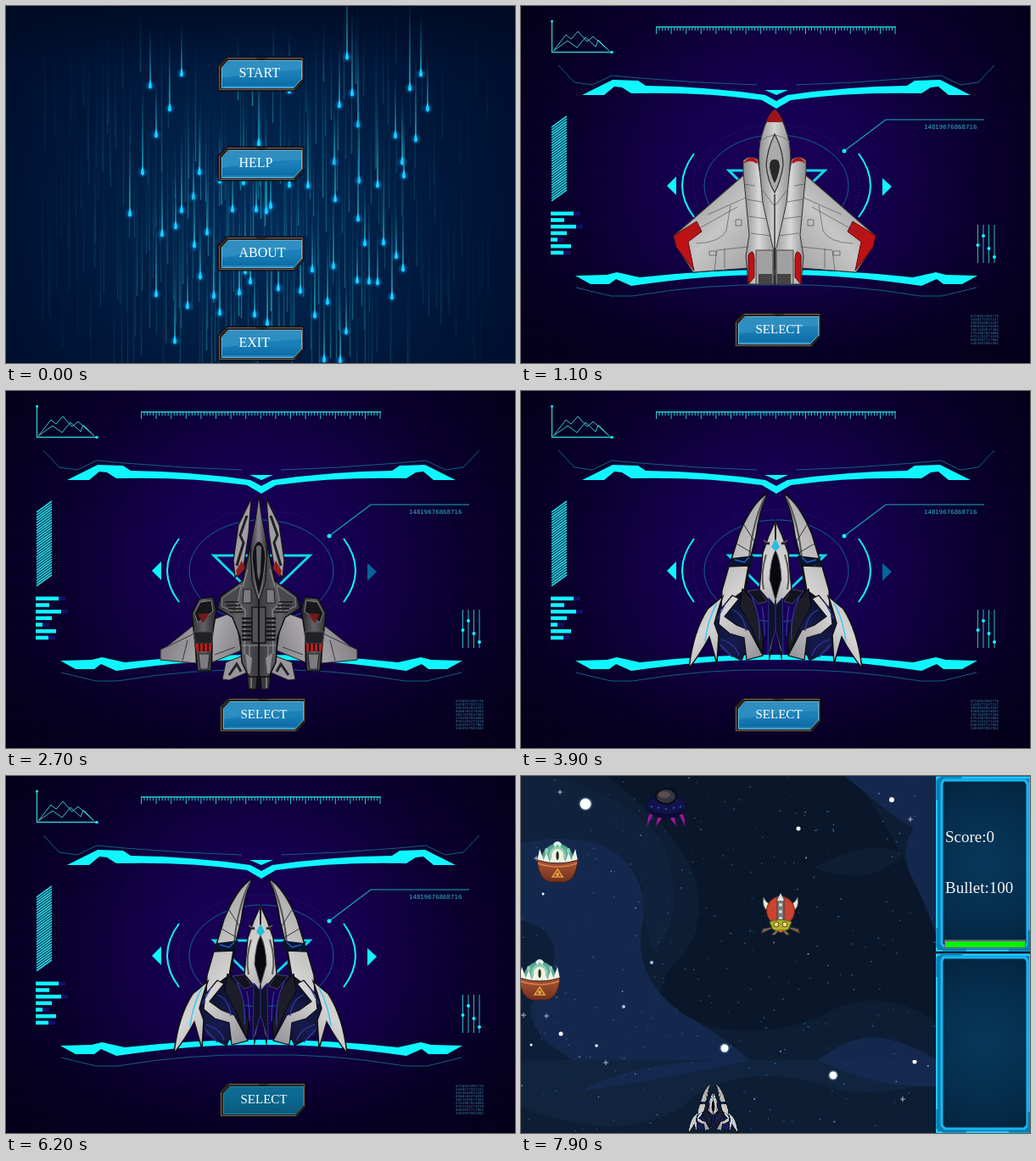
An HTML page with a canvas for the animation above (8 s loop, 600 px wide and 421 px high).

```html
<!DOCTYPE html>
<html lang="en">
<head>
<meta charset="utf-8">
<title>Space shooter</title>
<style>
html, body { margin: 0; width: 100%; height: 100%; overflow: hidden; background: #000; }
canvas { display: block; width: 600px; height: 421px; }
</style>
</head>
<body>
<canvas id="stage" width="600" height="421"></canvas>
<script>
const W = 600, H = 421, LOOP = 8000;
const SERIF = '"Liberation Serif", serif', SANS = '"DejaVu Sans", sans-serif';
const CYAN = '#0ff6ff', TEAL = '#18a9b8';
let g;

function seeded(seed) {
  return () => {
    seed = (seed + 0x6D2B79F5) | 0;
    let t = Math.imul(seed ^ (seed >>> 15), 1 | seed);
    t = (t + Math.imul(t ^ (t >>> 7), 61 | t)) ^ t;
    return ((t ^ (t >>> 14)) >>> 0) / 4294967296;
  };
}

function shape(d, fill, stroke, width = 1) {
  const p = new Path2D(d);
  if (fill) { g.fillStyle = fill; g.fill(p); }
  if (stroke) { g.strokeStyle = stroke; g.lineWidth = width; g.stroke(p); }
}

function oval(x, y, rx, ry, fill, stroke, width = 1) {
  g.beginPath();
  g.ellipse(x, y, rx, ry, 0, 0, 7);
  if (fill) { g.fillStyle = fill; g.fill(); }
  if (stroke) { g.strokeStyle = stroke; g.lineWidth = width; g.stroke(); }
}

function rect(x, y, w, h, fill) { g.fillStyle = fill; g.fillRect(x, y, w, h); }

function text(s, x, y, font, fill) {
  g.font = font;
  g.fillStyle = fill;
  g.fillText(s, x, y);
}

function ramp(x0, y0, x1, y1, ...colors) {
  const r = g.createLinearGradient(x0, y0, x1, y1);
  colors.forEach((c, i) => r.addColorStop(i / (colors.length - 1), c));
  return r;
}

function glow(x, y, radius, ...colors) {
  const r = g.createRadialGradient(x, y, 0, x, y, radius);
  colors.forEach((c, i) => r.addColorStop(i / (colors.length - 1), c));
  return r;
}

// Draws a half and its reflection about the vertical line at x.
function mirrored(x, half) {
  half();
  g.save();
  g.translate(2 * x, 0);
  g.scale(-1, 1);
  half();
  g.restore();
}

function placed(x, y, draw) {
  g.save();
  g.translate(x, y);
  draw();
  g.restore();
}

function layer(w, h, draw) {
  const c = document.createElement('canvas');
  c.width = w;
  c.height = h;
  g = c.getContext('2d');
  draw();
  return c;
}

function button(x, y, label, size, pressed) {
  placed(x, y, () => {
    shape('M10 0H101V28L91 40H0V10Z', '#2b2524', '#0b0b12');
    shape('M11 1.500H99.500V27M1.500 11V38.500H90', null, '#6b5a55');
    shape('M12 4.500H98.500V26L89 36.500H4.500V13Z',
      pressed ? ramp(0, 4, 0, 37, '#0f6d96', '#0b668c', '#0a5879') : ramp(0, 4, 0, 37, '#2380b6', '#1a80b8', '#0a67a2'),
      pressed ? '#1787a8' : '#5cb9dd');
    if (!pressed) {
      shape('M13 5.500H98V15Q55 17 5 25V14Z', 'rgba(110,195,230,.2)');
      shape('M6 35H89', null, '#38a8da');
    }
    shape('M45 1H58M48 3H55', null, '#111');
    text(label, 24.500, 24, size + 'px ' + SERIF, '#fff');
  });
}

// ---- Menu ----
const DROPS = [170,94, 207,80, 193,121, 177,152, 161,196, 146,245, 184,269, 200,260, 207,241, 221,225,
  228,196, 237,267, 222,282, 267,240, 252,206, 280,208, 295,240, 312,236, 307,242, 334,100,
  334,211, 356,212, 387,184, 393,117, 402,60, 408,103, 415,140, 416,206, 388,228, 415,251,
  438,211, 459,153, 467,184, 469,200, 476,97, 489,80, 497,121, 483,157, 445,279, 423,280,
  460,295, 468,310, 428,325, 438,326, 455,343, 386,307, 414,324, 379,349, 361,311, 364,365,
  401,384, 347,336, 321,333, 282,313, 275,338, 293,364, 308,374, 288,325, 245,342, 252,362,
  229,319, 214,354, 177,340, 199,395, 375,417, 394,418, 298,162];

function streak(x, top, bottom, color, width) {
  rect(x - width / 2, top, width, bottom - top, ramp(0, top, 0, bottom, 'rgba(10,90,130,0)', color));
}

const menuLayer = layer(W, H, () => {
  const rnd = seeded(11);
  rect(0, 0, W, H, glow(300, 250, 360, '#022a56', '#012148', '#001638', '#000e2c'));
  rect(0, 0, W, 70, ramp(0, 0, 0, 70, 'rgba(0,10,32,.7)', 'rgba(0,10,32,0)'));
  for (let i = 0; i < 260; i++) {
    const x = 42 + Math.round((i * 7.7) % 530);
    const strength = Math.max(.12, 1 - Math.abs(x - 305) / 265);
    const top = rnd() * 330 - 10;
    streak(x + .5, top, top + 70 + rnd() * 130, `rgba(30,150,170,${(.45 + rnd() * .5) * strength})`, 1.4);
  }
  for (let i = 0; i < DROPS.length; i += 2) {
    const x = DROPS[i], y = DROPS[i + 1];
    streak(x, y - 60 - rnd() * 60, y, '#1fa3c0', 1.8);
    oval(x, y, 6, 8, glow(x, y, 7, 'rgba(0,160,255,.65)', 'rgba(0,130,230,0)'));
    shape(`M${x} ${y - 7}Q${x + 4} ${y + 3} ${x} ${y + 3.500}Q${x - 4} ${y + 3} ${x} ${y - 7}`, '#1bd0fb');
  }
});

function menu(t) {
  g.drawImage(menuLayer, 0, 0);
  ['START', 'HELP', 'ABOUT', 'EXIT'].forEach((label, i) =>
    button(250, 60 + i * 106, label, 16, i === 0 && t > 700));
}

// ---- Hangar ----
const hangarLayer = layer(W, H, () => {
  rect(0, 0, W, H, glow(300, 205, 350, '#1b025c', '#15004e', '#0a002e', '#04001a'));
  rect(0, 300, W, 121, ramp(0, 300, 0, H, 'rgba(4,0,26,0)', 'rgba(4,0,26,.65)'));
  for (let i = 8; i < W; i += 27) {
    rect(i, 0, 1, H, 'rgba(70,40,150,.05)');
    rect(0, i, W, 1, 'rgba(70,40,150,.05)');
  }
  // Chart and ruler
  shape('M36.500 18V54.500H107', null, '#35c6d0', 1.3);
  oval(36.500, 18, 1.500, 1.500, CYAN);
  oval(107, 54.500, 2, 1.500, CYAN);
  shape('M38 53L53 34L59 39L67 30L78 42L85 36L104 53M38 53L55 41L66 49L76 37L88 48L91 40L104 53', null, '#3ac9d2');
  rect(159, 24, 283, 1.5, '#25c6d0');
  for (let i = 0; i <= 80; i++) rect(159 + i * 3.52, 24, 1, i % 5 ? 5 : 9, '#25c6d0');
  // Frame
  mirrored(301, () => {
    shape('M44 70L63 90L84 93L107 82L140 85Q210 91 278 93', null, '#155f7e');
    shape('M72 105L108 87L138 88L147 94Q220 95 288 105L301 112V121L284 111Q215 101 130 103L119 96L110 95L98 105Z', CYAN);
    shape('M64 318L101 317L113 314L140 320Q220 311 301 311V317Q225 316 130 330L112 322L104 328H82Z', CYAN);
    shape('M65 332L106 342H131Q220 327 301 329', null, '#155f7e');
    shape('M204 174Q176 212 204 249', null, CYAN, 2);
  });
  shape('M287 99H315L301 105Z', CYAN);
  // Target rings
  g.setLineDash([1, 3]);
  oval(301, 212, 98, 72, null, '#1c3a86');
  g.setLineDash([]);
  oval(301, 212, 85, 60, null, '#11628f');
  shape('M245 194H358L301 249Z', null, '#12d9e8', 3);
  // Side gauges
  for (let y = 143; y < 231; y += 3.1) shape(`M36 ${y}L54 ${y - 13}`, null, '#22d5de', 1.7);
  [27, 16, 30, 19, 8, 24, 15].forEach((w, i) => {
    const y = 242.500 + i * 7.7;
    rect(35, y, i % 2 ? w : w + 8, 4.500, '#140f68');
    rect(35, y, w, 4.500, CYAN);
  });
  [282, 271, 286, 296].forEach((y, i) => {
    const x = 538.500 + i * 6.5;
    rect(x - .5, 258, 1, 45, '#2cb8c8');
    oval(x, y, 2, 2, CYAN);
  });
  shape('M381 171L430 134H546', null, TEAL, 1.2);
  oval(381, 171, 2.5, 2.5, CYAN);
  text('14819676868716', 475, 145, '7px ' + SANS, '#25b5c4');
  const rnd = seeded(5);
  for (let i = 0; i < 9; i++) {
    let digits = '';
    while (digits.length < 13) digits += Math.floor(rnd() * 10);
    text(digits, 530, 367 + i * 4.05, '4px ' + SANS, '#397f9c');
  }
  shape('M172 212L183 201V223Z', CYAN);
});

function heavyFighter() {
  const steel = ramp(180, 200, 299, 310, '#858585', '#c6c6c6', '#999');
  const red = ramp(0, 120, 0, 330, '#a41518', '#c61015');
  mirrored(299, () => {
    shape('M264 198L180 271L183 283L203 314L268 309L276 220Z', steel, '#333', 1.2);
    shape('M180 271L207 254L213 266L197 278L204 312L183 284Z', red, '#5d0b0d');
    shape('M262 196V182Q270 175 279 181L287 230L298 270V328H268L265 295L269 270Z', ramp(262, 0, 299, 0, '#8c8c8c', '#d8d8d8', '#999'), '#333');
    shape('M262 186Q270 173 279 183L278 186Q270 180 262 186Z', red);
    shape('M268 294Q274 284 275 298V320L268 328Z', red, '#511');
    shape('M277 288H297V328H277Z', '#a1a1a1', '#444');
    rect(280, 316, 16, 12, '#444');
    shape('M263 210L276 212M266 228L284 231M268 248L289 251M271 268L295 271M220 246L265 226M207 280Q235 279 242 265L247 235M228 312L231 288L268 284M196 270L255 237M240 309V286',
      null, 'rgba(60,60,60,.55)');
    shape('M253 252h7v7h-7ZM222 289h8v5h-8Z', null, 'rgba(60,60,60,.6)');
  });
  mirrored(299, () => {
    shape('M299 122Q290 130 284 152Q279 168 281 190L285 232L297 285H299Z', ramp(280, 0, 299, 0, '#8e8e8e', '#d2d2d2'));
    shape('M299 122Q290 130 284 152Q279 168 281 190L285 232L297 285', null, '#333');
    shape('M299 122Q293 126 289 137H299Z', '#9b1717');
    shape('M281 160Q290 153 299 152M283 215L298 235', null, '#777');
  });
  shape('M299 151Q309 170 309 188Q306 207 299 220Q291 207 289 188Q290 170 299 151Z', '#aaa', '#333', 1.3);
  shape('M299 181Q305 180 305 190Q303 202 299 209Q295 202 293 190Q293 180 299 181Z', '#28282b');
  shape('M299 222V328', null, '#333', 1.5);
}

function darkRaider() {
  const steel = ramp(182, 270, 298, 320, '#77757a', '#a9a7ab', '#6d6b70');
  const dark = ramp(248, 0, 298, 0, '#2d2d30', '#626266', '#3a3a3e');
  mirrored(298, () => {
    shape('M224 274L190 301L182 305V317L224 321Z', steel, '#222');
    shape('M243 270L270 260L277 306L243 320Z', steel, '#222');
    shape('M189 302L222 286M208 318L214 294M246 311L270 302', null, '#39393d');
    // Prong
    shape('M289 127L274 158L268 200L270 220L280 207L286 168Z', '#a09da2', '#18181a', 1.3);
    shape('M284 147L276 170L280 179L272 206', null, '#202024', 3);
    shape('M271 212L278 200L282 209L273 219Z', '#8f1d20');
    // Tail
    shape('M277 313L259 320L255 340L263 341L286 331Z', '#99969b', '#1b1b1d');
    shape('M263 335L272 322L277 331', null, '#242428', 3);
    shape('M283 325L286 352H295L297 325Z', '#38383c', '#0e0e10', 1.3);
    shape('M289 328V350', null, '#74747a', 2);
    // Engine pod
    shape('M228 245L244 243L248 258L243 290L242 330H226L222 290L219 262Z', ramp(219, 0, 247, 0, '#303034', '#626267', '#28282c'), '#0d0d0f', 1.4);
    shape('M229 249L242 247L244 260L226 273L222 262Z', '#17171a', '#818086');
    shape('M226 263L240 262L232 274Z', '#701a1e');
    shape('M221 284H244L243 298H223Z', '#202125', '#4d4d52');
    shape('M223 298H242V307H224Z', '#b51d20');
    shape('M228 298v9m5-9v9m5-9v9', null, '#2a1010', 2);
    shape('M227 310H240L238 328H229Z', '#7d7b80', '#222');
    // Hull
    shape('M298 166L289 178L283 205L279 224L253 242L249 256L267 267L276 290L278 320L286 337H298Z', dark, '#0c0c0e', 1.4);
    shape('M277 229L255 244L254 254L271 261Z', '#49494d', '#88868c');
    shape('M280 234H289V250H279Z', '#7c7a80', '#1a1a1d');
    shape('M285 210L279 231M270 249L282 258L281 310M278 300H298M287 300V333', null, '#98969c');
    for (let y = 267; y < 295; y += 5) rect(278, y, 12, 2.5, '#17171a');
    for (let y = 248; y < 263; y += 4) rect(258 + (y - 248) / 2, y, 16, 1.5, '#161618');
    shape('M282 309L290 315L288 333H285Z', '#8c8a90');
  });
  shape('M298 124L302 152L308 182L306 224L298 248L290 224L288 182L294 152Z', ramp(288, 0, 308, 0, '#303034', '#85838a', '#2a2a2e'), '#0d0d0f');
  shape('M298 177Q306 180 306 198Q304 222 298 243Q292 222 290 198Q290 180 298 177Z', '#121216', '#727178');
  shape('M295 184Q298 180 301 184L300 214L298 224L296 214Z', '#69676e');
  shape('M290 255H306V297H290Z', '#505055', '#19191c', 1.5);
  shape('M298 255V350', null, '#111114', 2);
}

function bladeShip() {
  const bone = ramp(198, 200, 300, 300, '#a9a8a8', '#d6d4d3', '#929196');
  const navy = ramp(235, 240, 300, 320, '#080d25', '#171b4d', '#0a0b1d');
  mirrored(300, () => {
    shape('M290 121Q272 132 257 169L247 202L270 199L277 171Q280 145 290 121Z', bone, '#101014', 1.6);
    shape('M287 126Q273 155 269 197', null, '#535358', 2);
    shape('M263 158L275 177M254 180L271 190', null, '#333');
    shape('M249 197L274 194L272 207L244 205Z', '#09142c');
    shape('M252 199L263 202L269 196', null, '#2261d4', 1.3);
    shape('M245 207L269 205L266 238L278 260L286 306L267 301L260 318L236 306L226 282L236 244Z', navy, '#101014');
    shape('M245 207L268 206L263 235L248 246L236 256L237 235Z', bone, '#101014', 1.4);
    shape('M261 233L275 249L286 290L284 310L272 280L258 254Z', '#1c1d26', '#07070b');
    shape('M267 236L281 234L290 248L280 251Z', '#12131f', '#45465a');
    shape('M238 242L220 257Q203 283 198 327Q212 309 222 290L231 322L233 288L228 274Q233 255 238 242Z', bone, '#101014', 1.5);
    shape('M249 241L235 258L233 275L246 286L263 291L266 317L285 312L269 282L254 276L240 266L257 245Z', bone, '#101014', 1.2);
    shape('M231 250Q220 270 217 295', null, '#34c9f5', 1.5);
    shape('M242 249L231 269M249 258Q263 263 265 283M236 293Q254 299 257 312M235 299L249 314M272 243Q283 265 281 293M284 254Q287 270 287 289', null, '#2f3aa8', 1.3);
    shape('M300 153L292 171L285 191L281 234L292 247L293 314L300 281Z', bone, '#101014', 1.4);
    shape('M289 193Q282 215 286 234M286 176L293 181', null, '#58585b', 2);
    shape('M292 244L300 253V282L291 311Z', '#0f1228', '#2d3190');
  });
  shape('M300 188Q306 199 307 222L300 247L293 222Q294 199 300 188Z', '#08080e', '#55555a');
  shape('M300 174L305 184L300 189L295 184Z', '#28bcdd');
  shape('M300 152V175M293 179L287 181M307 179L313 181', null, '#222', 2);
}

const ships = [heavyFighter, darkRaider, bladeShip].map(draw => layer(W, H, draw));
const CHOICES = [[5300, 2], [4600, 1], [4100, 0], [3200, 2], [2000, 1], [0, 0]];

function hangar(t) {
  g.drawImage(hangarLayer, 0, 0);
  shape('M437 213L426 203V224Z', t >= 1700 && t < 6000 ? '#07649b' : CYAN);
  g.drawImage(ships[CHOICES.find(([start]) => t >= start)[1]], 0, 0);
  button(252, 362, 'SELECT', 15, t >= 6100);
}

// ---- Game ----
const spaceTile = layer(490, H, () => {
  const rnd = seeded(29);
  rect(0, 0, 490, H, '#0d1d33');
  g.translate(0, 86);
  // Clouds, measured from the wrap line 86 px below the tile's top
  shape('M0-86H490V-62Q410-36 350-58Q255-86 190-32Q120 15 0-30Z', '#10243e');
  shape('M100 0H390Q440 60 490 190V290Q420 242 350 285Q270 315 195 287Q145 265 178 225Q222 185 206 125Q190 65 100 0Z', '#0a172a');
  shape('M0 79Q65 65 108 88Q145 110 145 165Q127 235 190 280Q235 304 270 335H0Z', '#14284d');
  shape('M0 170Q40 180 40 212Q34 243 12 270Q9 290 28 312L60 335H0Z', '#0d1f38');
  shape('M0 0H38Q105 19 142 50Q175 77 178 121Q190 171 157 207Q144 180 145 151Q143 107 108 88Q64 65 0 79Z', '#10223b');
  shape('M382 0H490V188Q479 153 459 116Q446 83 463 62Q432 43 382 0Z', '#14284d');
  shape('M345 108Q414 72 452 91Q425 120 390 117Q366 118 345 108Z', '#0d1d33');
  shape('M350 335Q385 308 417 308Q455 312 490 335Z', '#14284d');
  shape('M70-49Q135-87 270-86Q180-66 70-49ZM350-86H490V-55Q420-52 350-86Z', '#152950');
  for (let i = 0; i < 330; i++) {
    const size = .6 + rnd() * 1.1;
    rect(rnd() * 490, rnd() * H - 86, size, size, rnd() < .18 ? '#83adc3' : '#2b627e');
  }
  const stars = [76,33,6.5, 240,321,4.5, 368,-68,4.5, 437,28,3, 327,62,2.5, 47,304,2.5, 464,-84,2.5,
    154,220,2, 121,272,2, 26,139,1.5, 89,318,1.8, 12,317,1.5];
  for (let i = 0; i < stars.length; i += 3) {
    const [x, y, r] = stars.slice(i, i + 3);
    if (r > 4) oval(x, y, r + 1.5, r + 1.5, 'rgba(150,190,220,.35)');
    oval(x, y, r, r, r === 2 ? '#9bc7e5' : '#fff');
  }
  [[18, 97], [30, 283], [46, 19], [459, 51], [3, 282], [450, -40], [100, -83]].forEach(([x, y]) =>
    shape(`M${x - 3} ${y}h6m-3-3v6`, null, '#c8deec', .8));
});

function bowlAlien() {
  oval(0, -2, 19, 20, '#59a993', '#357768');
  oval(0, -8, 10, 11, '#8fcbb5');
  oval(0, -8, 7, 8, '#f0f3da');
  oval(0, -8, 1.6, 5, '#202a28');
  mirrored(0, () => {
    shape('M-24-2L-21-16L-16-2ZM-17-1L-13-12L-9 0ZM-10 0L-6-7L-3 1Z', '#eef3e9');
    oval(-13, -14, 2, 3, '#8ed0b7');
  });
  shape('M-5-22Q0-28 5-22L3-18L0-21L-3-18Z', '#d9eee2');
  shape('M-24-3Q0 5 24-3Q22 20 9 23H-9Q-22 20-24-3Z', ramp(0, -3, 0, 23, '#a95632', '#753020'), '#4b2118');
  shape('M-23 1Q0 9 23 1', null, '#d6814d', 1.5);
  shape('M0 8L6 17H-6Z', null, '#e8a23d', 1.5);
  oval(0, 14, 2, 2, '#eaa744');
}

function saucer() {
  mirrored(0, () => {
    shape('M-18 4Q-23 12-22 21L-17 10L-13 5ZM-9 8L-12 21L-5 12L-4 8Z', '#a71ca5', '#5f126c');
  });
  oval(0, -2, 24, 13, '#11134a', '#080a26');
  shape('M-23-1Q0 14 23-1Q17 12 0 12Q-17 12-23-1Z', '#090b30');
  oval(0, -14, 12, 9, '#34343d', '#0b0b18', 2);
  oval(-2, -16, 7, 4, '#5a4d4d');
  [-17, -9, 0, 9, 17].forEach(x => oval(x, 1 - Math.abs(x) / 6, 1.5, 1, '#304daf'));
}

function hornedShip() {
  mirrored(0, () => {
    shape('M-13-4Q-23-10-20-22Q-16-13-8-13L-9-2Z', '#eceae0', '#555');
    shape('M-8 14L-23 21L-21 15L-11 13ZM-5 16L-11 22L-7 23L-1 17Z', '#786452', '#222');
  });
  oval(0, -6, 16.500, 17, '#c94330', '#732018');
  shape('M-4-23H4V8H-4Z', '#777b7b', '#3c3c3f');
  shape('M0-27L4-18H-4Z', '#e4e4de');
  [-13, -5, 3].forEach(y => oval(0, y, 2, 2, '#d9d9d4'));
  shape('M-13 7Q0 2 13 7L9 16Q0 20-9 16Z', '#a6b72e', '#57621b');
  oval(-5, 10, 3, 3, '#efe562', '#6c3921');
  oval(5, 10, 3, 3, '#efe562', '#6c3921');
  shape('M-5 16H5L0 20Z', '#d06c25');
}

function panelFrame(y, h) {
  rect(489, y, 111, h, '#0b80b8');
  shape(`M490 ${y + 2}H600V${y + h - 1}H490Z`, null, '#24c8ff', 2);
  shape(`M498 ${y + 5}H594L597 ${y + 9}V${y + h - 9}L593 ${y + h - 5}H500L496 ${y + h - 9}V${y + 9}Z`,
    glow(546, y + h / 2, 130, '#07385b', '#052e4d', '#041f37'), '#16b7f4', 3);
  shape(`M491 ${y + 28}V${y + 6}L498 ${y + 1}H520M491 ${y + h - 28}V${y + h - 6}L498 ${y + h - 2}H525M575 ${y + h - 2}H599V${y + h - 25}`,
    null, '#087cae', 3);
}

const panelLayer = layer(W, H, () => {
  panelFrame(0, 207);
  panelFrame(209, 212);
  rect(499, 193, 96, 10, '#6d587d');
  rect(500, 195, 94, 7, '#00f600');
  text('Score:0', 500, 78, '19px ' + SERIF, '#f4f4f4');
  text('Bullet:100', 500, 138, '19px ' + SERIF, '#f4f4f4');
});

const ENEMIES = [[bowlAlien, 43, 102], [bowlAlien, 22, 241], [saucer, 171, 38], [hornedShip, 306, 165]];

function game(t) {
  const seam = Math.round((t - 6500) * 335 / 1400) % H;
  g.drawImage(spaceTile, 0, seam - H);
  g.drawImage(spaceTile, 0, seam);
  for (const [draw, x, y] of ENEMIES) placed(x, y + (t - 7900) * .17, draw);
  g.drawImage(ships[2], 226.5 - 300 * .285, 363 - 121 * .28, W * .285, H * .28);
  g.drawImage(panelLayer, 0, 0);
}

const screen = document.getElementById('stage').getContext('2d');

function frame(now) {
  const t = Math.floor((now % LOOP) / 100) * 100;
  g = screen;
  g.clearRect(0, 0, W, H);
  (t < 1000 ? menu : t < 6500 ? hangar : game)(t);
  requestAnimationFrame(frame);
}
requestAnimationFrame(frame);
</script>
</body>
</html>
```
